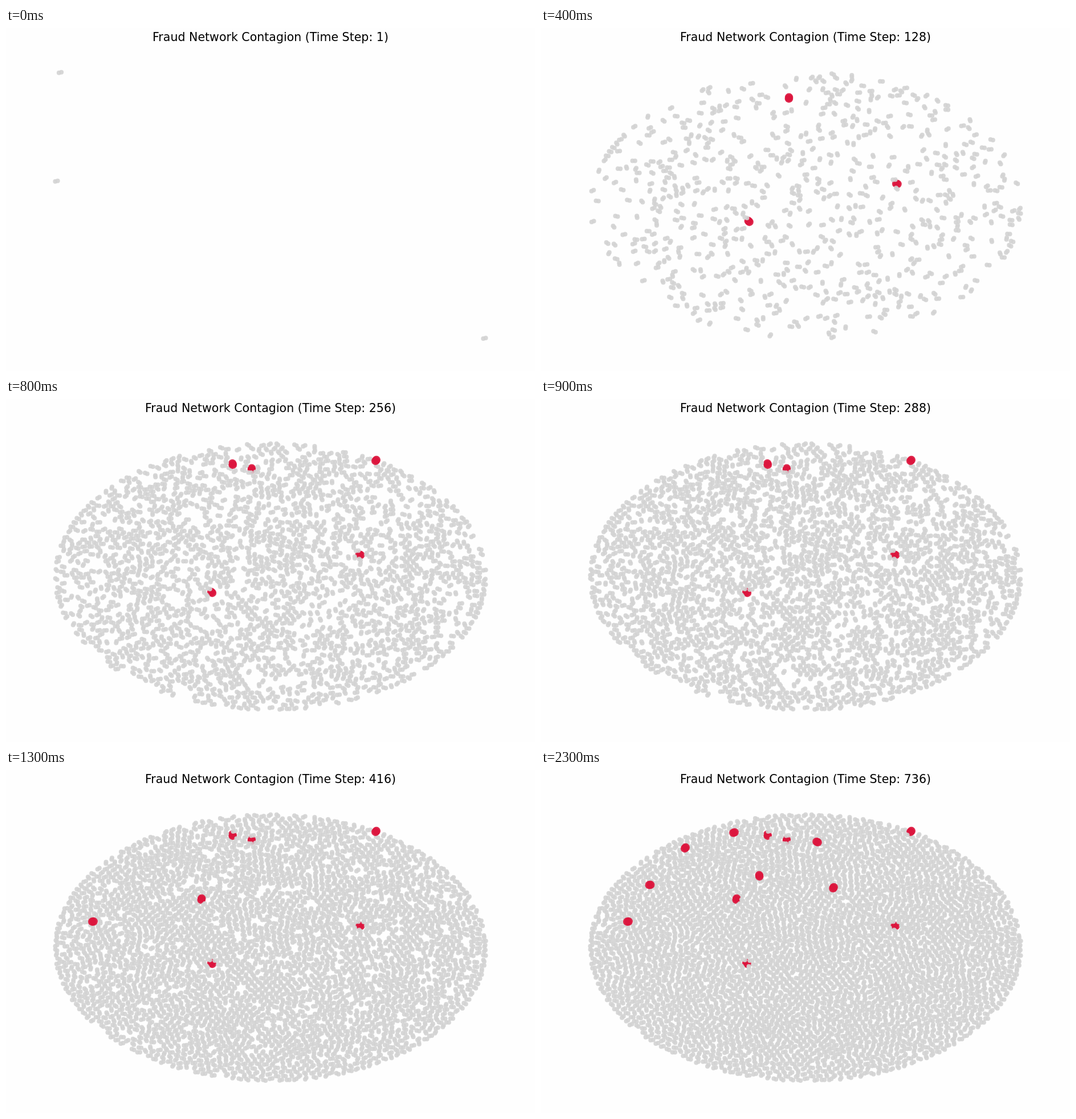
An HTML page with a canvas for the animation above (2400 ms loop, 928 px wide and 603 px high).

```html
<!DOCTYPE html>
<html lang="en">
<head>
<meta charset="utf-8">
<title>Fraud Network Contagion</title>
<style>
  html, body { margin: 0; width: 928px; height: 603px; overflow: hidden; background: #fefefe; }
  canvas { display: block; }
</style>
</head>
<body>
<canvas id="stage" width="928" height="603"></canvas>
<script>
const start = performance.now();
const ctx = document.getElementById('stage').getContext('2d');
const FRAMES = 24, FRAME_MS = 100, STEPS = 32;
const COUNT = 3150, GOLDEN = Math.PI * (3 - Math.sqrt(5));
const CX = 464, CY = 312.5, RX = 376, RY = 233;
const PITCH = 1.04 * Math.sqrt(1.1547 * Math.PI / COUNT);
const GREY = 'rgba(211,211,211,.9)', RED = 'rgba(220,20,60,.9)';

// Pairs of the first step, then fraud pairs in order of appearance
const firstPairs = [[95, 78.3], [88.5, 269.3], [839.4, 545.5]];
const frauds = [
  [361, 340], [621, 274], [431, 123], [397.5, 114.5], [649, 108], [343, 227], [152.5, 266.5],
  [191, 202], [513, 207], [253, 137], [338.5, 110], [383, 186], [484.5, 126.5]
];

let seed = 20;
function random() {
  seed = (seed * 1664525 + 1013904223) >>> 0;
  return seed / 4294967296;
}

// Share of the network present at a frame
const share = frame => 1 - Math.exp(-((frame / 8.1) ** 2));
const fraudFrame = i => Math.min(23, Math.ceil(2.06 * i - .25));

// Nodes live in a unit disc that is stretched to the wide ellipse
function makeNode(x, y, birth, fraud) {
  const tilt = random() * Math.PI, reach = fraud ? 1.2 : 2.2;
  return { x, y, birth, fraud, dx: reach * Math.cos(tilt), dy: reach * Math.sin(tilt) * (fraud ? 1 : .65) };
}

function scatter(i) {
  const r = Math.sqrt((i + .5) / COUNT), a = i * GOLDEN;
  const jitter = () => (random() - .5) * 3 * PITCH;
  return makeNode(r * Math.cos(a) + jitter(), r * Math.sin(a) + jitter(), random(), false);
}

// Push close neighbours apart; fraud nodes hold their place
function relax(nodes) {
  nodes.sort((a, b) => a.x - b.x);
  nodes.forEach((a, i) => {
    for (let j = i + 1; j < nodes.length && nodes[j].x - a.x < 2 * PITCH; j++) {
      const b = nodes[j], x = b.x - a.x, y = b.y - a.y, d = Math.hypot(x, y) || 1e-6;
      if (d >= PITCH) continue;
      const push = .3 * (PITCH - d) / d;
      if (!a.fraud) { a.x -= x * push; a.y -= y * push; }
      if (!b.fraud) { b.x += x * push; b.y += y * push; }
    }
  });
  for (const n of nodes) {
    const r = Math.hypot(n.x, n.y);
    if (r > 1 && !n.fraud) { n.x /= r; n.y /= r; }
  }
}

const nodes = [
  ...frauds.map(([x, y], i) => makeNode((x - CX) / RX, (y - CY) / RY, share(fraudFrame(i)), true)),
  ...Array.from({ length: COUNT }, (_, i) => scatter(i))
];
for (let i = 0; i < 40; i++) relax(nodes);
nodes.sort((a, b) => a.birth - b.birth);

function dot(x, y, r) {
  ctx.beginPath();
  ctx.arc(x, y, r, 0, 2 * Math.PI);
  ctx.fill();
}

function pair(x, y, dx, dy, fraud) {
  const r = fraud ? 7.3 : 4;
  ctx.fillStyle = fraud ? RED : GREY;
  dot(x - dx, y - dy, r);
  dot(x + dx, y + dy, r);
}

function drawNetwork(frame) {
  const limit = share(frame), drift = Math.max(0, 8 - frame);
  for (const n of nodes) {
    if (n.birth > limit) break;
    // The young network still leans right, except at its ends
    const x = CX + RX * n.x + drift * (1 - n.x * n.x);
    pair(x, CY + RY * n.y, n.dx, n.dy, n.fraud);
  }
}

function draw(frame) {
  ctx.fillStyle = '#fefefe';
  ctx.fillRect(0, 0, 928, 603);
  if (frame) drawNetwork(frame);
  else for (const [x, y] of firstPairs) pair(x, y, 2.1, -.5, false);

  ctx.fillStyle = '#000';
  ctx.font = '20.55px "DejaVu Sans", sans-serif';
  ctx.textAlign = 'center';
  ctx.fillText(`Fraud Network Contagion (Time Step: ${frame * STEPS || 1})`, CX, 23);
}

let shown = -1;
function tick() {
  const frame = Math.floor((performance.now() - start) / FRAME_MS) % FRAMES;
  if (frame !== shown) draw(shown = frame);
  requestAnimationFrame(tick);
}
tick();
</script>
</body>
</html>
```
